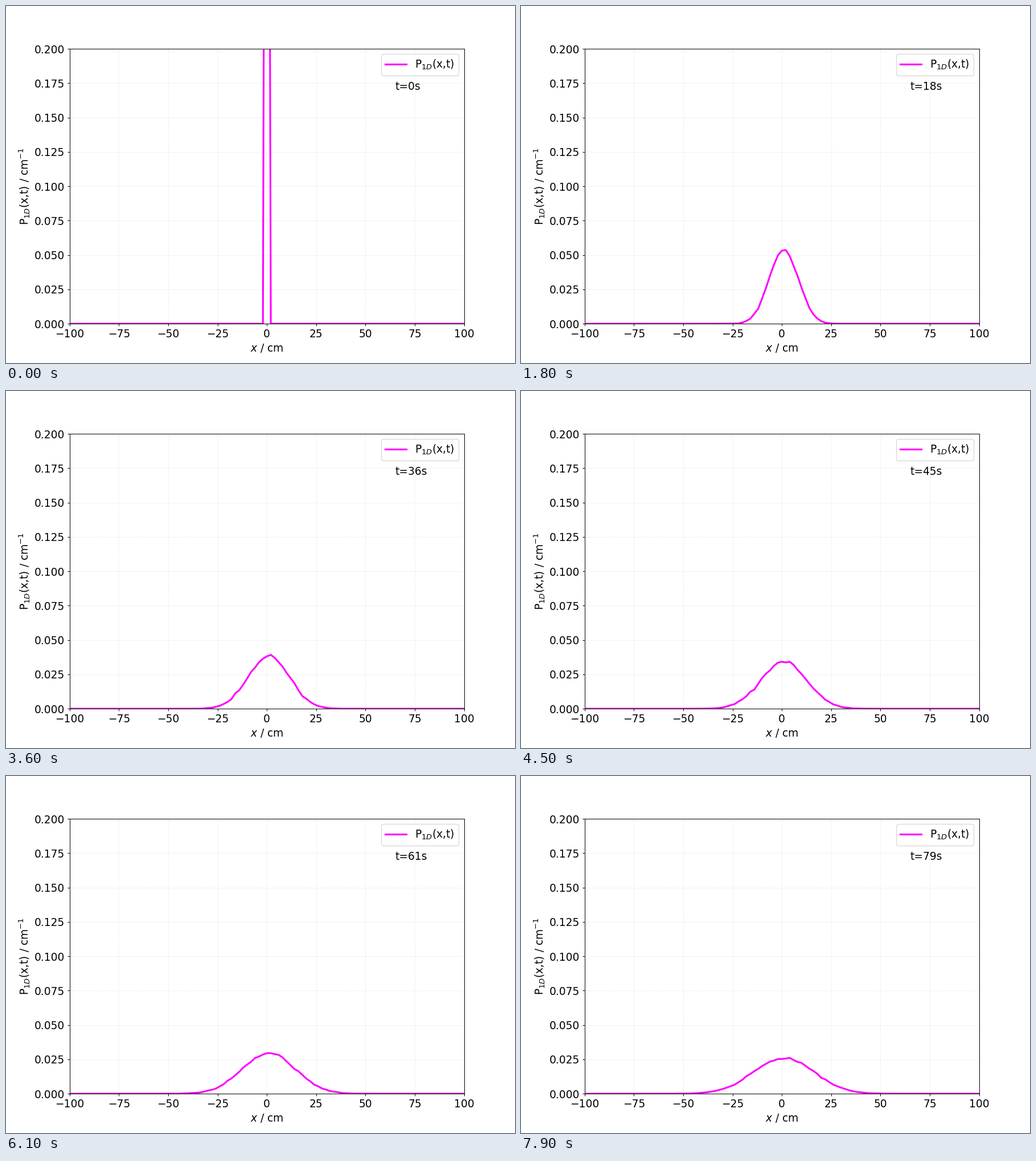
Animation, 894 px wide and 626 px high, one loop 8000 ms. Source, as a matplotlib script:

```python
import numpy as np
import matplotlib.pyplot as plt
from matplotlib.animation import FuncAnimation

WIDTH, HEIGHT, DPI = 894, 626, 89.4
STEPS, INTERVAL = 80, 100
WALKERS, MAX_STEP, BIN = 50000, 3, 2

plt.rcParams.update({"font.family": "DejaVu Sans", "font.size": 15})

x = np.arange(-100, 101, BIN)


def simulate():
    """Density of a 1D random walk, one row per second."""
    rng = np.random.default_rng(7)
    pos = np.zeros(WALKERS)
    rows = [(x == 0).astype(float)]
    edges = np.append(x - BIN, x[-1])  # each bin is labelled by its right edge
    for _ in range(1, STEPS):
        pos += rng.uniform(-MAX_STEP, MAX_STEP, WALKERS)
        counts, _ = np.histogram(pos, bins=edges)
        rows.append(counts / (WALKERS * BIN))
    return np.array(rows)


density = simulate()

fig, ax = plt.subplots(figsize=(WIDTH / DPI, HEIGHT / DPI), dpi=DPI)
line, = ax.plot(x, density[0], color="magenta", lw=2.5,
                label="P$_{1D}$(x,t)")
clock = ax.text(65, 0.17, "t=0s")

ax.set_xlim(-100, 100)
ax.set_ylim(0, 0.2)
ax.set_xticks(np.arange(-100, 101, 25))
ax.set_yticks(np.linspace(0, 0.2, 9))
ax.set_xlabel("$x$ / cm")
ax.set_ylabel("P$_{1D}$(x,t) / cm$^{-1}$")
ax.grid(ls=":", alpha=0.4)
ax.legend(loc="upper right")


def update(t):
    line.set_ydata(density[t])
    clock.set_text(f"t={t}s")
    return line, clock


anim = FuncAnimation(fig, update, frames=STEPS, interval=INTERVAL,
                     repeat=True, repeat_delay=0, blit=False)
plt.show()
```
